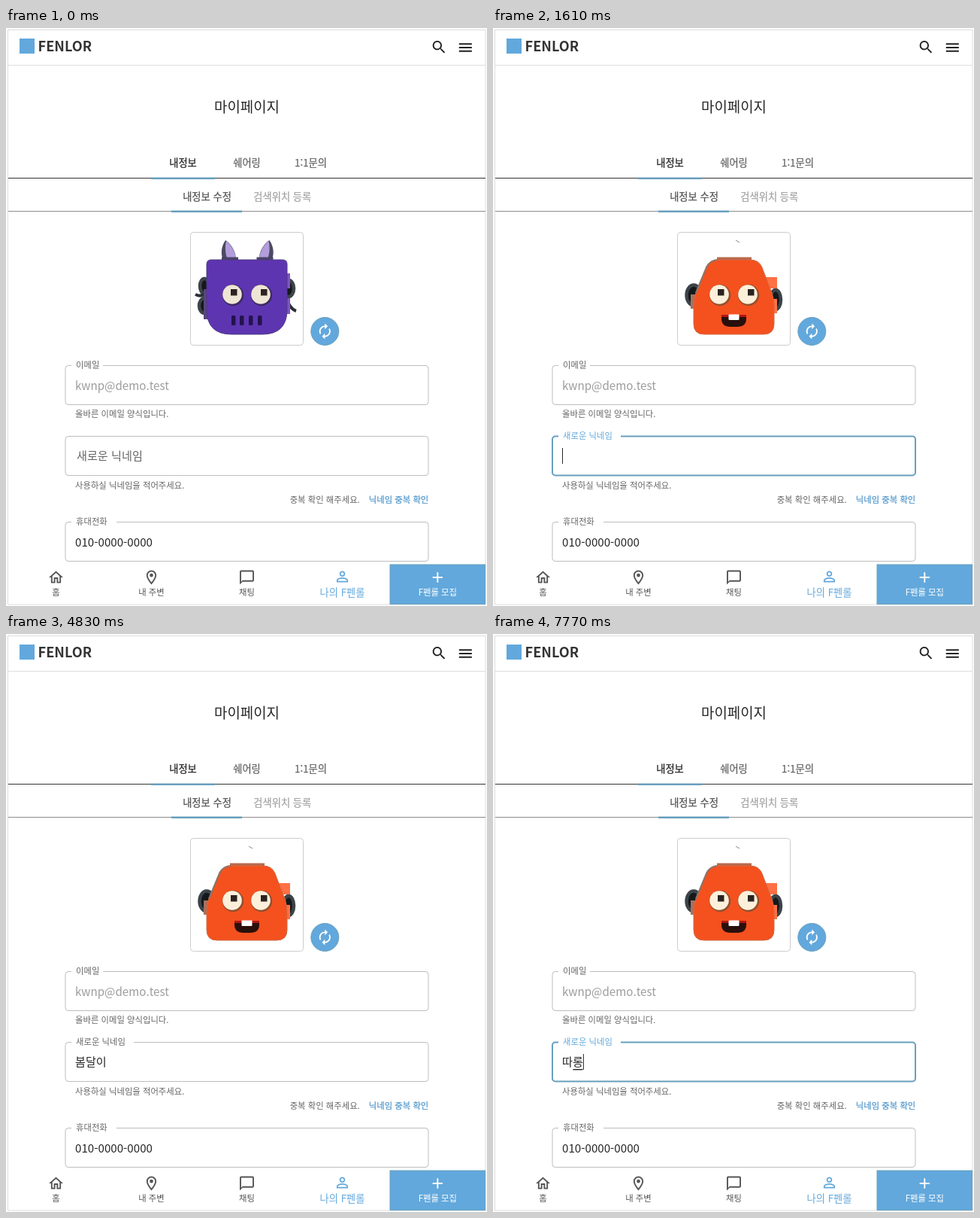
Recreate the animation shown at these times as an HTML page. Size 640 px wide and 768 px high, loop 8000 ms.

```html
<!DOCTYPE html>
<html lang="ko">
<head>
<meta charset="utf-8">
<title>마이페이지</title>
<style>
html, body { margin: 0; width: 100%; height: 100%; overflow: hidden; background: #fff; }
svg { display: block; width: 100vw; height: 100vh; }
text { font-family: "Noto Sans CJK KR", "Noto Sans CJK", "Noto Sans", sans-serif; white-space: pre; }
</style>
</head>
<body>
<svg id="stage" viewBox="0 0 640 768"></svg>
<script>
const LOOP = 8000, BLUE = '#62a8dc', DUSK = '#689fbe', INK = '#262626', GREY = '#666', LINE = '#bdbdbd';
const BIG = 15.15, MID = 13.25, SMALL = 11.36, CELL = BIG * 0.92;
const stage = document.getElementById('stage');

// Text placed by the vertical centre of its glyphs
const text = (x, cy, str, size, fill, anchor = 'start', weight = 400) =>
  `<text x="${x}" y="${cy + size * 0.38}" font-size="${size}" fill="${fill}" text-anchor="${anchor}" font-weight="${weight}"
    ${weight === 500 ? `stroke="${fill}" stroke-width=".25"` : ''}>${str}</text>`;
const rect = (x, y, w, h, fill, extra = '') =>
  `<rect x="${x}" y="${y}" width="${w}" height="${h}" fill="${fill}" ${extra}/>`;
const path = (d, fill, extra = '') => `<path d="${d}" fill="${fill}" ${extra}/>`;
const icon = (cx, cy, fill, d) =>
  path(d, fill, `transform="translate(${cx} ${cy}) scale(.947) translate(-12 -12)"`);
const outline = (y, notch, stroke = LINE, width = 1) =>
  path(`M${notch} ${y}H558a4 4 0 0 1 4 4v44a4 4 0 0 1-4 4H83a4 4 0 0 1-4-4V${y + 4}a4 4 0 0 1 4-4H87`,
    'none', `stroke="${stroke}" stroke-width="${width}"`);

function eyes(cream, rim) {
  return [301, 339].map((x, i) =>
    `<circle cx="${x + 1}" cy="355" r="14.2" fill="${rim}"/>
     <circle cx="${x}" cy="354" r="12.8" fill="${cream}"/>` +
    rect(x - 2 + i * 2, 347, 8.5, 8.5, '#2c2320')).join('');
}

const ring = (cx, cy, rx, ry) =>
  `<ellipse cx="${cx}" cy="${cy}" rx="${rx}" ry="${ry}" fill="#15181b" stroke="#3c444a" stroke-width="4.5"/>`;

function purpleBot() {
  const horn = `${path('M292 282C286 291 286 299 288 306H306C305 296 299 286 292 282Z', '#4b4a63')}
    ${path('M293 283C291 292 292 299 294 306H306C304 296 299 287 293 283Z', '#b39ddb')}
    ${rect(287, 304.5, 22, 5, '#4a4468')}`;
  return horn + `<g transform="matrix(-1 0 0 1 642.5 0)">${horn}</g>` +
    ring(264, 343, 6, 10) + ring(264, 369, 7, 10) + ring(376, 346, 7, 11) +
    path('M252 354q8 4 14-2M376 366q4 8 10 10', 'none', 'stroke="#2b3036" stroke-width="4"') +
    rect(263, 347, 6, 40, '#59457f') + rect(372, 326, 6, 20, '#7e57c2') + rect(372, 359, 6, 21, '#7e57c2') +
    path('M273 308H368Q374 308 374 314V374Q374 407 341 407H300Q267 407 267 374V314Q267 308 273 308Z', '#5e35b1', 'stroke="#4c3a80"') +
    eyes('#efe5d5', '#3d2a63') +
    [300, 311, 323, 335].map(x => rect(x, 382, 5.5, 13, '#24124f', 'rx="1.5"')).join('');
}

function orangeBot() {
  return path('M323 282l5 3', 'none', 'stroke="#888"') +
    ring(267, 355, 9.5, 13.5) + ring(376, 361, 7, 13) +
    rect(263, 354, 7, 19, '#a8705c') + rect(361, 331, 17, 15, '#ff7043') + rect(371, 360, 7, 19, '#ff7043') +
    rect(298, 304.5, 46, 6, '#b9694c') +
    path('M300 308Q289 308 284.5 317L270 352Q267 360 267 371V393Q267 407 281 407H360Q374 407 374 393V371Q374 360 371 352L357.5 317Q353 308 342 308Z', '#f4511e', 'stroke="#cf6a45"') +
    path('M298 308Q289 309 284.5 317L270 352', 'none', 'stroke="#8f7468" stroke-width="2.2"') +
    eyes('#fdf0db', '#94502f') +
    path('M304 381H337V386Q337 397 325 397H316Q304 397 304 386Z', '#2a100c') +
    path('M304 381H337V384H304Z', '#b31712') + rect(313.5, 380.5, 14, 7.5, '#fff', 'rx="1"');
}

const page = [
  rect(0, 0, 640, 768, '#fff'),
  rect(2.5, 2.5, 635.5, 763.5, 'none', 'stroke="#dcdcdc"'),
  rect(3, 49, 635, 1, '#dedede'),
  rect(18, 14, 20, 20, BLUE),
  text(42.5, 24, 'FENLOR', 18.2, '#333', 'start', 700),
  icon(576.2, 25.5, '#222', 'M15.5 14h-.79l-.28-.27C15.41 12.59 16 11.11 16 9.5 16 5.91 13.09 3 9.5 3S3 5.91 3 9.5 5.91 16 9.5 16c1.61 0 3.09-.59 4.23-1.57l.27.28v.79l5 4.99L20.49 19l-4.99-5zm-6 0C7.01 14 5 11.99 5 9.5S7.01 5 9.5 5 14 7.01 14 9.5 11.99 14 9.5 14z'),
  icon(611.3, 26, '#222', 'M3 18h18v-2H3zm0-5h18v-2H3zm0-7v2h18V6z'),
  text(320.5, 105, '마이페이지', 18.9, INK, 'middle'),
  text(235.5, 179, '내정보', MID, INK, 'middle', 500),
  text(320.5, 179, '쉐어링', MID, GREY, 'middle', 500),
  text(405.5, 179, '1:1문의', MID, GREY, 'middle', 500),
  rect(3, 199, 635, 1, '#333'),
  rect(193, 198.5, 85, 2.5, DUSK),
  text(267.5, 223.5, '내정보 수정', MID, '#555', 'middle', 500),
  text(367.8, 223.5, '검색위치 등록', MID, '#a3a3a3', 'middle', 500),
  rect(3, 243, 635, 1, '#8c8c8c'),
  rect(220, 242.5, 94, 2.5, DUSK),
  rect(245.5, 271.5, 150, 150, '#fff', 'rx="4" stroke="#ccc"'),
  `<g id="purple">${purpleBot()}</g><g id="orange">${orangeBot()}</g>`,
  `<circle cx="424.3" cy="403" r="18.5" fill="${BLUE}" stroke="${DUSK}"/>`,
  icon(424.3, 403, '#fff', 'M12 6v3l4-4-4-4v3c-4.42 0-8 3.58-8 8 0 1.57.46 3.03 1.24 4.26L6.7 14.8c-.45-.83-.7-1.79-.7-2.8 0-3.31 2.69-6 6-6zm6.76 1.74L17.3 9.2c.44.84.7 1.79.7 2.8 0 3.31-2.69 6-6 6v-3l-4 4 4 4v-3c4.42 0 8-3.58 8-8 0-1.57-.46-3.03-1.24-4.26z'),
  outline(448.5, 129),
  text(93, 448, '이메일', SMALL, GREY),
  text(92, 475, 'kwnp@demo.test', BIG, '#9c9c9c'),
  text(92, 513, '올바른 이메일 양식입니다.', SMALL, GREY),
  '<g id="nick"></g>',
  text(92, 607.3, '사용하실 닉네임을 적어주세요.', SMALL, GREY),
  text(562.3, 627, '닉네임 중복 확인', SMALL, '#5599cc', 'end', 500),
  outline(656.5, 147),
  text(93, 656, '휴대전화', SMALL, GREY),
  text(92, 683, '010-0000-0000', BIG, INK),
  icon(66.5, 730, '#555', 'M12 5.69l5 4.5V18h-2v-6H9v6H7v-7.81l5-4.5M12 3 2 12h3v8h6v-6h2v6h6v-8h3L12 3z'),
  icon(193.5, 730, '#555', 'M12 2C8.13 2 5 5.13 5 9c0 5.25 7 13 7 13s7-7.75 7-13c0-3.87-3.13-7-7-7zM7 9c0-2.76 2.24-5 5-5s5 2.24 5 5c0 2.88-2.88 7.19-5 9.88C9.92 16.21 7 11.85 7 9zM9.5 9a2.5 2.5 0 1 0 5 0 2.5 2.5 0 1 0-5 0z'),
  icon(320.5, 730, '#555', 'M20 2H4c-1.1 0-2 .9-2 2v18l4-4h14c1.1 0 2-.9 2-2V4c0-1.1-.9-2-2-2zm0 14H6l-2 2V4h16v12z'),
  icon(447.5, 729, BLUE, 'M12 5.9c1.16 0 2.1.94 2.1 2.1s-.94 2.1-2.1 2.1S9.9 9.16 9.9 8s.94-2.1 2.1-2.1m0 9c2.97 0 6.1 1.46 6.1 2.1v1.1H5.9V17c0-.64 3.13-2.1 6.1-2.1M12 4C9.79 4 8 5.79 8 8s1.79 4 4 4 4-1.79 4-4-1.79-4-4-4zm0 9c-2.67 0-8 1.34-8 4v3h16v-3c0-2.66-5.33-4-8-4z'),
  text(66.5, 750, '홈', SMALL, '#555', 'middle'),
  text(193.5, 750, '내 주변', SMALL, '#555', 'middle'),
  text(320.5, 750, '채팅', SMALL, '#555', 'middle'),
  text(447.5, 750, '나의 F펜롤', MID, BLUE, 'middle'),
  rect(511, 713, 126.5, 52.5, BLUE, `stroke="${DUSK}"`),
  icon(574.3, 730, '#fff', 'M19 13h-6v6h-2v-6H5v-2h6V5h2v6h6v2z'),
  text(574.3, 750, 'F펜롤 모집', SMALL, '#fff', 'middle'),
];
stage.innerHTML = page.join('');
const [purple, orange, nick] = ['purple', 'orange', 'nick'].map(id => document.getElementById(id));

// Keystrokes, with jamo joining into syllables
const KEYS = [
  [0, ''], [2590, 'ㅂ'], [2730, '보'], [2800, '봄'], [2940, '봄ㄷ'], [3080, '봄다'], [3150, '봄달'], [3360, '봄달이'],
  [7280, 'ㄸ'], [7420, '따'], [7560, '딸'], [7700, '따로'], [7770, '따롱'],
];
const T = { avatar: 490, hover: 1120, focus: 1330, blur: 4760, taken: 5040, hover2: 5250, focus2: 6020, select: 6160, retype: 7280 };
const BLINKS = [[1890, 2450], [3885, 4445]];
const within = (t, a, b) => t >= a && t < b;

function drawNick(t) {
  const value = KEYS.findLast(k => k[0] <= t)[1];
  const focused = within(t, T.focus, T.blur) || t >= T.focus2;
  const hovered = within(t, T.hover, T.focus) || within(t, T.hover2, T.focus2);
  const selected = within(t, T.select, T.retype);
  const composing = value && (t < T.blur || t >= T.retype);
  const p = Math.min(1, Math.max(0, (t - T.focus) / 200));
  const rise = 1 - (1 - p) ** 3;
  const end = 92 + value.length * CELL;

  let out = outline(542.5, 87 + 83 * rise, focused ? DUSK : hovered ? '#333' : LINE, focused ? 2 : 1);
  out += text(94 - rise, 568 - 26 * rise, '새로운 닉네임', BIG * (1 - 0.25 * rise), focused ? BLUE : GREY);
  if (selected) out += rect(92, 558, end - 92, 21.5, '#add3f4');
  out += text(92, 568.5, value, BIG, INK);
  if (composing) out += rect(end - CELL + 0.5, 578, CELL - 1, 1.4, INK);
  if (focused && !selected && !BLINKS.some(b => within(t, ...b))) out += rect(end, 558, 1, 21, INK);
  out += within(t, T.taken, T.retype)
    ? text(470.8, 627, '사용중인 닉네임 입니다.', SMALL, '#d57d7d', 'end')
    : text(470.8, 627, '중복 확인 해주세요.', SMALL, GREY, 'end');
  return out;
}

let last;
function frame(now) {
  const t = now % LOOP;
  purple.style.display = t < T.avatar ? '' : 'none';
  orange.style.display = t < T.avatar ? 'none' : '';
  const markup = drawNick(t);
  if (markup !== last) nick.innerHTML = last = markup;
  requestAnimationFrame(frame);
}
requestAnimationFrame(frame);
</script>
</body>
</html>
```
